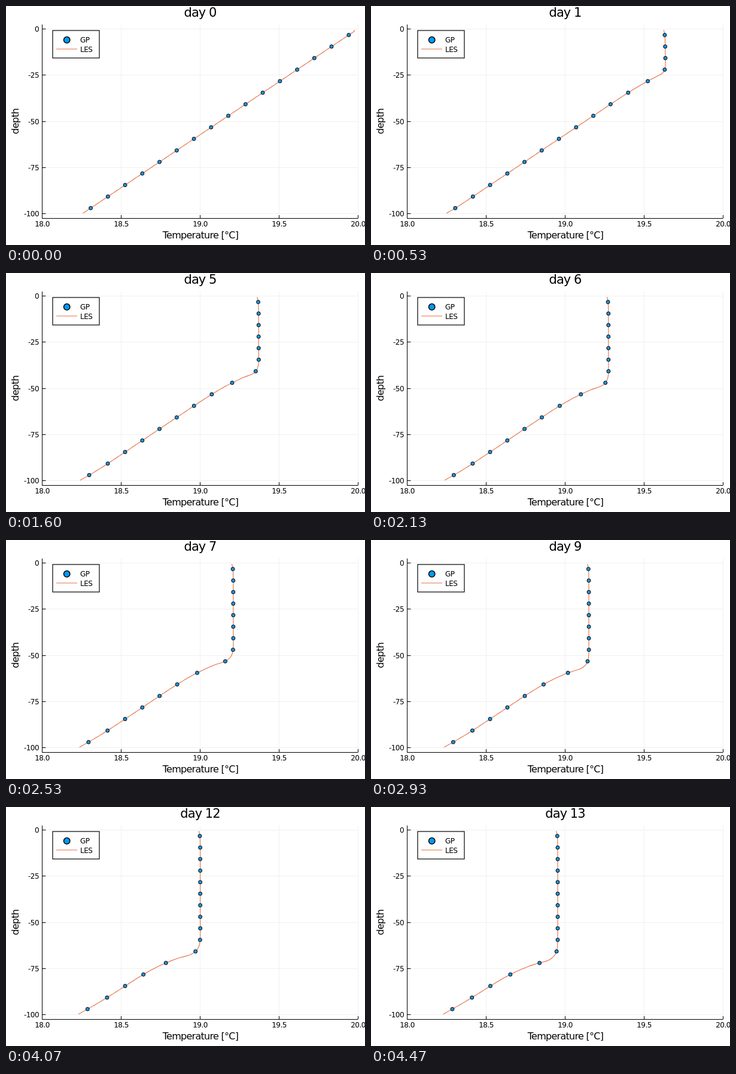
Recreate the animation shown at these times as an HTML page with a canvas. Size 600 by 400 pixels, loop 4540 ms.

```html
<!DOCTYPE html>
<html lang="en">
<head>
<meta charset="utf-8">
<title>Temperature profile</title>
<style>
  html, body { margin: 0; width: 100%; height: 100%; overflow: hidden; background: #fff; }
  canvas { display: block; }
</style>
</head>
<body>
<canvas id="stage" width="600" height="400"></canvas>
<script>
const ctx = document.getElementById('stage').getContext('2d');
const LOOP = 4540, STEPS = 68;
const ORANGE = '#e36f47', BLUE = '#009afa';
const LEFT = 60.5, RIGHT = 588, TOP = 31, BOTTOM = 355.5;
const SMALL = 12, MEDIUM = 16, LARGE = 21;
const yAt = depth => 38.9 + 3.09 * depth;

// Horizontal position of the profile: a linear gradient eroded by a mixed layer
// that deepens with the square root of time.
function xAt(depth, step) {
  const root = Math.sqrt(step);
  const initial = 587.2 - 4.6 * depth;
  const hook = 2.5 * Math.exp(-(depth - 0.39) / (step ? 2.2 : 0.2));
  if (!step) return initial - hook;
  const mixed = 586.5 - 33.53 * root;
  const u = depth - 8.75 * root;
  const below = 1 / (1 + Math.exp(u * (0.33 + 0.25 / root) + 0.4 * Math.tanh(u)));
  const v = (99.6 - depth) / root;
  const bottomLoss = root * Math.exp(-v - 0.4 * v * v);
  return initial + (mixed - initial) * below - hook - bottomLoss;
}

function stroke(points, color, width = 1) {
  ctx.beginPath();
  points.forEach(([x, y]) => ctx.lineTo(x, y));
  ctx.strokeStyle = color;
  ctx.lineWidth = width;
  ctx.stroke();
}

function dot(x, y, r, width, fill) {
  ctx.beginPath();
  ctx.arc(x, y, r, 0, 2 * Math.PI);
  ctx.fillStyle = fill;
  ctx.fill();
  ctx.strokeStyle = '#000';
  ctx.lineWidth = width;
  ctx.stroke();
}

function text(str, x, y, size, align = 'center') {
  ctx.font = `${size}px "DejaVu Sans", sans-serif`;
  ctx.letterSpacing = `${-0.045 * size}px`;
  ctx.textAlign = align;
  ctx.fillStyle = '#000';
  ctx.fillText(str, x, y);
}

function drawAxes() {
  const xTicks = [0, 1, 2, 3, 4].map(i => [LEFT + 132 * i, (18 + i / 2).toFixed(1)]);
  const yTicks = [0, 25, 50, 75, 100].map(d => [Math.floor(yAt(d) - 0.3) + 0.5, String(-d)]);
  for (const [x] of xTicks) stroke([[x, TOP], [x, BOTTOM]], '#f0f0f0');
  for (const [y] of yTicks) stroke([[LEFT, y], [RIGHT, y]], '#f0f0f0');
  stroke([[LEFT, TOP], [LEFT, BOTTOM], [RIGHT, BOTTOM]], '#000');
  for (const [x, label] of xTicks) {
    stroke([[x, BOTTOM], [x, BOTTOM - 5.5]], '#000');
    text(label, x, 369, SMALL);
  }
  for (const [y, label] of yTicks) {
    stroke([[LEFT, y], [LEFT + 6, y]], '#000');
    text(label, 55, y + 4.5, SMALL, 'right');
  }
  text('Temperature [°C]', 325, 389, MEDIUM);
  ctx.save();
  ctx.translate(21, 193);
  ctx.rotate(-Math.PI / 2);
  text('depth', 0, 0, MEDIUM);
  ctx.restore();
}

function drawLegend() {
  ctx.fillStyle = '#fff';
  ctx.fillRect(78, 41, 78, 46);
  ctx.strokeStyle = '#000';
  ctx.lineWidth = 1.2;
  ctx.strokeRect(78, 41, 78, 46);
  dot(101.7, 56.8, 5.2, 1.5, BLUE);
  stroke([[84, 72], [119, 72]], ORANGE);
  text('GP', 124, 61, SMALL, 'left');
  text('LES', 124, 76.5, SMALL, 'left');
}

function draw(step) {
  ctx.fillStyle = '#fff';
  ctx.fillRect(0, 0, 600, 400);
  drawAxes();
  text('day ' + Math.floor(step * 5 / 24), 324.5, 18, LARGE);

  const profile = Array.from({ length: 128 }, (_, i) => {
    const depth = (i + 0.5) * 100 / 128;
    return [xAt(depth, step), yAt(depth)];
  });
  stroke(profile, ORANGE, 1.1);
  for (let i = 0; i < 16; i++) {
    const depth = (i + 0.5) * 6.25;
    dot(xAt(depth, step), yAt(depth), 3, 1, '#1c92dd');
  }
  drawLegend();
}

function tick() {
  const t = performance.now() % LOOP;
  draw(Math.min(STEPS - 1, Math.floor(t * 0.015 + 0.06)));
  requestAnimationFrame(tick);
}
tick();
</script>
</body>
</html>
```
